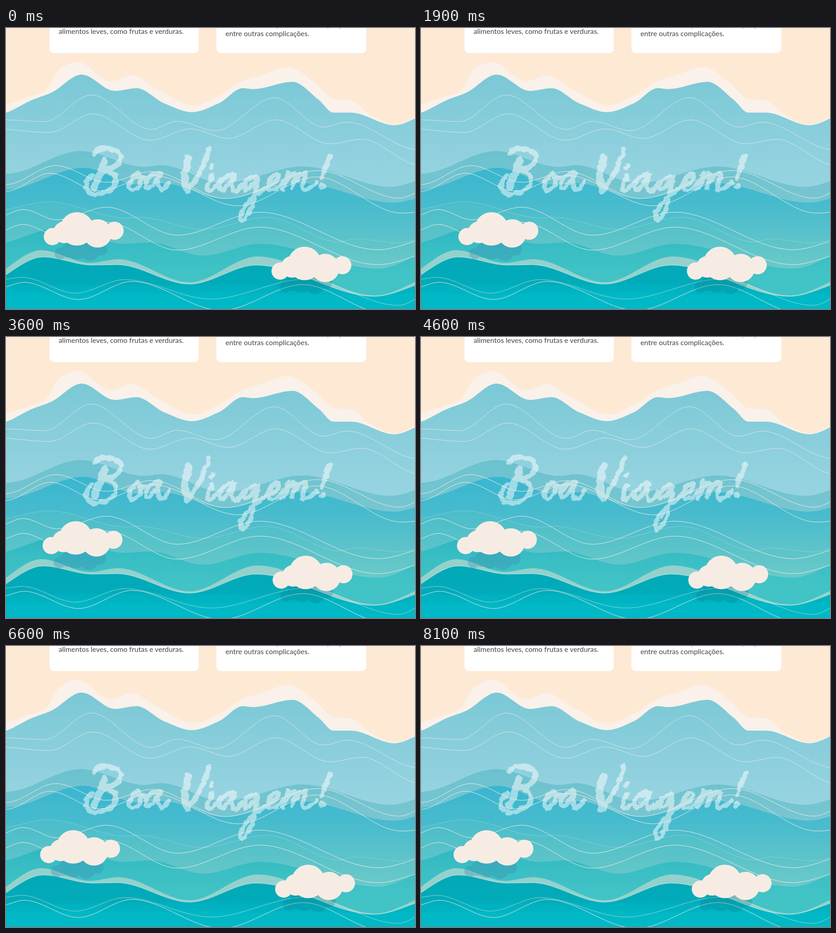
These frames come from a looping animation (902 px wide and 621 px high, 8200 ms). An HTML page:

```html
<!DOCTYPE html>
<html lang="pt">
<head>
<meta charset="utf-8">
<title>Boa Viagem!</title>
<style>
  html, body { margin: 0; width: 100%; height: 100%; overflow: hidden; background: #fee9d4; }
  svg { display: block; width: 902px; height: 621px; }
  text { font: 15.8px Lato, sans-serif; fill: #444; }
  path { stroke-linecap: round; stroke-linejoin: round; }
</style>
</head>
<body>
<svg viewBox="0 0 902 621">
  <defs>
    <g id="cloud">
      <circle cx="102.3" cy="461" r="19"/>
      <circle cx="128.5" cy="451.5" r="24"/>
      <circle cx="156.3" cy="444" r="37"/>
      <circle cx="202" cy="454" r="31.3"/>
      <circle cx="239.5" cy="448" r="20"/>
    </g>
    <path id="letterA" d="M336 319Q306 330 308 352Q318 362 340 322Q330 352 342 358Q350 358 359 341"/>
    <filter id="rough" filterUnits="userSpaceOnUse" x="150" y="240" width="600" height="210" color-interpolation-filters="sRGB">
      <feTurbulence id="noise" type="fractalNoise" baseFrequency=".07" numOctaves="3" seed="0"/>
      <feDisplacementMap in="SourceGraphic" scale="11" xChannelSelector="R" yChannelSelector="G"/>
    </filter>
  </defs>

  <rect x="96" y="-40" width="329" height="95.5" rx="10" fill="#fff"/>
  <rect x="464" y="-40" width="330.5" height="95.5" rx="10" fill="#fff"/>
  <text x="116" y="13">alimentos leves, como frutas e verduras.</text>
  <text x="596 676 708 733 758" y="-2">p,pç,</text>
  <text x="484" y="18">entre outras complicações.</text>

  <g id="waves"></g>

  <g role="img" aria-label="Boa Viagem!" fill="none" stroke="#fff" stroke-width="10" opacity=".5" filter="url(#rough)">
    <!-- B -->
    <path stroke-width="11" d="M195 277Q204 263 228 267T254 287Q248 310 214 314Q247 318 241 343Q230 365 194 368Q160 356 190 325"/>
    <path stroke-width="17" d="M217 293Q207 322 195 352"/>
    <!-- o a -->
    <path d="M292 322Q270 334 272 352Q280 366 294 346Q302 330 292 322Q298 334 314 331"/>
    <use href="#letterA"/>
    <!-- V -->
    <path stroke-width="17" d="M403 286Q388 330 400 358"/>
    <path stroke-width="11" d="M401 360Q434 316 448 267"/>
    <!-- i a -->
    <path d="M455 327Q434 362 453 358Q461 354 468 342M452 309L455 304"/>
    <use href="#letterA" x="163" y="3"/>
    <!-- g e m -->
    <path d="M550 329Q522 336 526 356Q536 360 555 331Q546 400 530 419Q512 434 519 405Q535 378 578 348"/>
    <path d="M580 347Q600 342 601 328Q592 314 579 343Q574 366 598 354Q606 350 613 340"/>
    <path d="M622 319Q618 340 609 357Q628 318 638 323Q638 335 630 353Q648 314 661 324Q646 362 662 358Q673 353 686 341"/>
    <!-- ! -->
    <path stroke-width="12" d="M715 282Q708 298 701 318M696 351L699 349"/>
    <path stroke-width="8" d="M701 318L697 332"/>
  </g>

  <g id="lines" fill="none" stroke="#f6efe6"></g>

  <g id="left">
    <use href="#cloud" transform="translate(52.2 194) scale(.66)" fill="#3c84ad" opacity=".3"/>
    <use href="#cloud" fill="#f6ece4"/>
  </g>
  <g id="right">
    <use href="#cloud" transform="translate(547.5 268) scale(.66)" fill="#0a7988" opacity=".25"/>
    <use href="#cloud" x="502.2" y="76.3" fill="#f6ece4"/>
  </g>
</svg>

<script>
const $ = id => document.getElementById(id);

function add(parent, tag, attrs) {
  const node = document.createElementNS('http://www.w3.org/2000/svg', tag);
  for (const key in attrs) node.setAttribute(key, attrs[key]);
  parent.append(node);
  return node;
}

// Swell through crests, troughs and shoulders: level at each crest, trough and end.
function swell(points) {
  const p = points.split(' ').map(s => s.split(',').map(Number));
  const rise = i => (p[i + 1][1] - p[i][1]) / (p[i + 1][0] - p[i][0]);
  const slope = i => {
    if (i === 0 || i === p.length - 1) return 0;
    const a = rise(i - 1), b = rise(i);
    return a * b > 0 ? 2 * a * b / (a + b) : 0;
  };
  let d = 'M' + p[0];
  for (let i = 1; i < p.length; i++) {
    const [x0, y0] = p[i - 1], [x1, y1] = p[i], k = (x1 - x0) / 3;
    d += `C${x0 + k},${y0 + slope(i - 1) * k} ${x1 - k},${y1 - slope(i) * k} ${x1},${y1}`;
  }
  return d;
}

// Each stop is [y on the stage, color].
function wave(name, points, stops, edge = 0) {
  const fill = add($('waves'), 'linearGradient', { id: name, gradientUnits: 'userSpaceOnUse', x1: 0, y1: 0, x2: 0, y2: 621 });
  for (const [y, color] of stops) add(fill, 'stop', { offset: y / 621, 'stop-color': color });
  const d = swell(points);
  add($('waves'), 'path', { d: d + 'V621H0V621Z', fill: `url(#${name})` });
  add($('waves'), 'path', { d, fill: 'none', stroke: '#e6f2ee', 'stroke-opacity': edge });
}

function line(opacity, points, y = 0) {
  add($('lines'), 'path', { d: swell(points), 'stroke-opacity': opacity, transform: `translate(0 ${y})` });
}

wave('surf', '-10,168 52,152 85,140 120,89 158,75 232,118 278,104 330,133 415,171 475,146 522,117 572,101 622,86 680,120 722,157 760,160 805,193 858,213 930,188',
  [[0, '#f9f1ea']]);
wave('shallow', '-20,191 60,158 100,143 167,103 240,139 288,133 350,167 410,186 470,166 522,133 545,135 632,119 690,159 722,187 760,187 857,215 940,188',
  [[105, '#7bc8d6'], [330, '#96d3e0']]);
wave('haze', '0,322 165,272 305,307 342,303 478,343 655,306 848,351 960,324',
  [[272, '#6bc2cf'], [385, '#78c6d1']]);
wave('blue', '0,357 170,309 290,346 345,343 480,377 650,343 855,386 960,364',
  [[310, '#39b6d0'], [400, '#4abccd'], [475, '#5fc4cb']]);
wave('aqua', '-30,404 95,384 265,420 292,418 435,445 575,418 735,473 770,466 865,475 950,458',
  [[385, '#4bbdca'], [450, '#57c2c9'], [530, '#6ac9c9']], .3);
wave('teal', '-30,478 120,441 260,477 318,474 435,503 560,477 820,532 960,487',
  [[445, '#2fb7c3'], [490, '#39bec4'], [550, '#42c3c6']]);
wave('foam', '-60,560 78,491 185,519 248,511 405,562 555,505 815,591 960,545',
  [[0, '#94d1cc']]);
wave('deep', '-60,570 82,506 190,524 245,523 405,566 552,524 812,593 960,556',
  [[505, '#02a9b8'], [566, '#02abb9'], [570, '#00b1c0'], [586, '#00b4c2'], [590, '#00b8c6']], .75);

line(.75, '0,203 85,207 188,148 320,224 378,206 462,227 592,154 700,219 752,208 910,269');
line(.75, '-20,223 95,231 192,190 318,248 407,223 490,244 595,203 715,256 785,246 915,304');
line(.95, '0,346 110,304 222,341 322,317 483,377 688,315 867,376 960,340');
line(.95, '0,361 97,321 207,360 323,326 512,393 685,329 872,409 960,402');
for (const y of [0, 33]) line(.95, '-25,420 38,401 112,424 222,396 378,458 560,407 820,490 960,460', y);
line(.6, '-10,556 35,551 153,586 262,556 452,599 660,555 865,613 940,585');
line(.9, '-20,576 40,562 160,600 278,560 475,624 655,567 835,630');

const LOOP = 8200, TICK = 100, LAST_STEP = 74;

function frame() {
  const tick = Math.floor(performance.now() % LOOP / TICK);
  // Every eleventh tick repeats the pose before it.
  const step = tick - Math.max(0, Math.floor((tick - 1) / 11));
  const p = step / LAST_STEP;
  const drift = p * (1 + 10.6 * p);
  $('left').setAttribute('transform', `translate(${-drift} 0)`);
  $('right').setAttribute('transform', `translate(${drift} 0)`);
  $('noise').setAttribute('seed', step % 5);
  requestAnimationFrame(frame);
}
frame();
</script>
</body>
</html>
```
